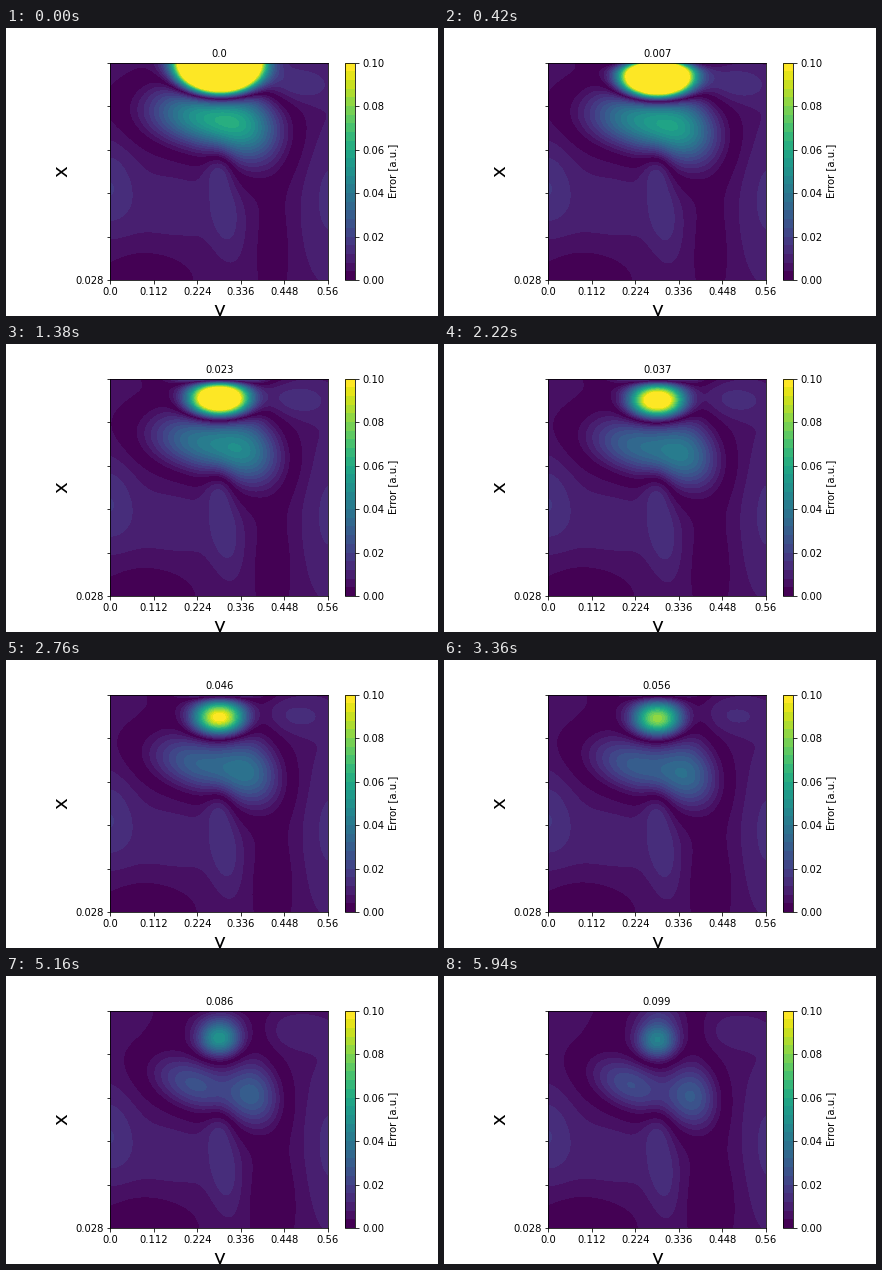
A matplotlib script for the animation above (6000 ms loop, 432x288 px).

```python
import numpy as np
import matplotlib.pyplot as plt
from matplotlib.animation import FuncAnimation
from matplotlib.cm import ScalarMappable
from matplotlib.colors import BoundaryNorm, ListedColormap

W, H, DPI = 432, 288, 72
FRAMES, STEP_MS = 100, 60
SIZE = 217.44
RIGHT, BOTTOM = 321.84, 252
LEFT, TOP = RIGHT - SIZE, BOTTOM - SIZE

LEVELS = np.linspace(0, 0.1, 26)
COLORS = plt.get_cmap("viridis")(np.linspace(0, 1, len(LEVELS) - 1))

plt.rcParams.update({"font.family": "DejaVu Sans", "font.size": 10})

# The field is laid out in stage pixels, y pointing down
X, Y = np.meshgrid(np.linspace(LEFT, RIGHT, 180), np.linspace(TOP, BOTTOM, 180))


def fade(k, tau):
    return np.exp(-k / tau)


def glide(k, start, end):
    return start + (end - start) * k / (FRAMES - 1)


def bump(cx, cy, sx, sy, angle=0):
    a = np.radians(angle)
    dx, dy = X - cx, Y - cy
    along = (dx * np.cos(a) + dy * np.sin(a)) / sx
    across = (dy * np.cos(a) - dx * np.sin(a)) / sy
    return np.exp(-0.5 * (along**2 + across**2))


def background(k):
    light = (
        0.009 * bump(102, 158, 18, 30)
        + 0.004 * bump(165, 180, 45, 30)
        + 0.008 * bump(219, glide(k, 180, 195), 11, 32, -6)
        + 0.007 * bump(324, 170, 20, 55)
        + glide(k, 0.010, 0.004) * bump(290, 56, 25, 13)
        + glide(k, 0.010, 0.006) * bump(214, glide(k, 138, 150), 10, 14)
    )
    dark = (
        glide(k, 0.006, 0.008) * bump(140, 250, 34, 23)
        + 0.006 * bump(267, 220, glide(k, 12, 21), 42)
        + 0.004 * bump(170, 50, 20, 16)
        + 0.005 * bump(250, 52, 12, 20)
    )
    return 0.006 + light - dark


def hot_spot(k):
    """Hot source at the top edge that detaches, sinks and cools."""
    amp = 0.025 + 0.3 * fade(k, 33) + 0.375 * fade(k, 4)
    cy = 35 + 17 * (1 - fade(k, 5)) + 0.12 * k
    spot = bump(213.5, cy, glide(k, 21, 13.5), glide(k, 10.5, 12.5) + 4.5 * fade(k, 5))
    rim = 0.16 * (1 - fade(k, 6)) * fade(k, 33) * bump(213, 30, 28, 7)
    glow = 0.012 * (k / FRAMES) ** 3 * bump(215, 33, 16, 9)
    return amp * spot - rim + glow


def lobes(k):
    """Two lobes below the source that drift down and apart."""
    left = bump(glide(k, 198, 187), 111 - 22 * fade(k, 40),
                glide(k, 40, 32), glide(k, 21, 18), glide(k, 8, 25))
    right = bump(glide(k, 242, 249), glide(k, 104, 119),
                 glide(k, 30, 25), glide(k, 24, 18), glide(k, 65, 80))
    return 0.028 * (1 + fade(k, 40)) * left + 0.031 * right


def error(k):
    signed = hot_spot(k) - lobes(k) + background(k)
    return np.clip(np.abs(signed), 1e-6, 0.0999)


fig, ax = plt.subplots(figsize=(W / DPI, H / DPI), dpi=DPI, facecolor="white")
fig.subplots_adjust(left=0.125, right=0.9, bottom=0.125, top=0.88)
scale = ScalarMappable(BoundaryNorm(LEVELS, len(COLORS)), ListedColormap(COLORS))
bar = fig.colorbar(scale, ax=ax, spacing="proportional",
                   ticks=np.linspace(0, 0.1, 6), format="%.2f")
bar.ax.minorticks_off()
bar.set_label("Error [a.u.]")

ax.set_aspect("equal")
ax.set_xlim(LEFT, RIGHT)
ax.set_ylim(BOTTOM, TOP)
ax.set_xticks(np.linspace(LEFT, RIGHT, 6),
              [str(round(0.112 * i, 3)) for i in range(6)])
ax.set_yticks(np.linspace(TOP, BOTTOM, 6), [""] * 5 + ["0.028"])
ax.set_xlabel("y", fontsize=20)
ax.set_ylabel("x", fontsize=20)
title = ax.set_title("0.0", fontsize=10)


def draw(k):
    for old in list(ax.collections):
        old.remove()
    ax.contourf(X, Y, error(k), levels=LEVELS, colors=COLORS)
    title.set_text(str(round(k * 0.001, 3)))
    return []


anim = FuncAnimation(fig, draw, frames=FRAMES, init_func=lambda: draw(0),
                     interval=STEP_MS, repeat=True, repeat_delay=0, blit=False)
plt.show()
```
